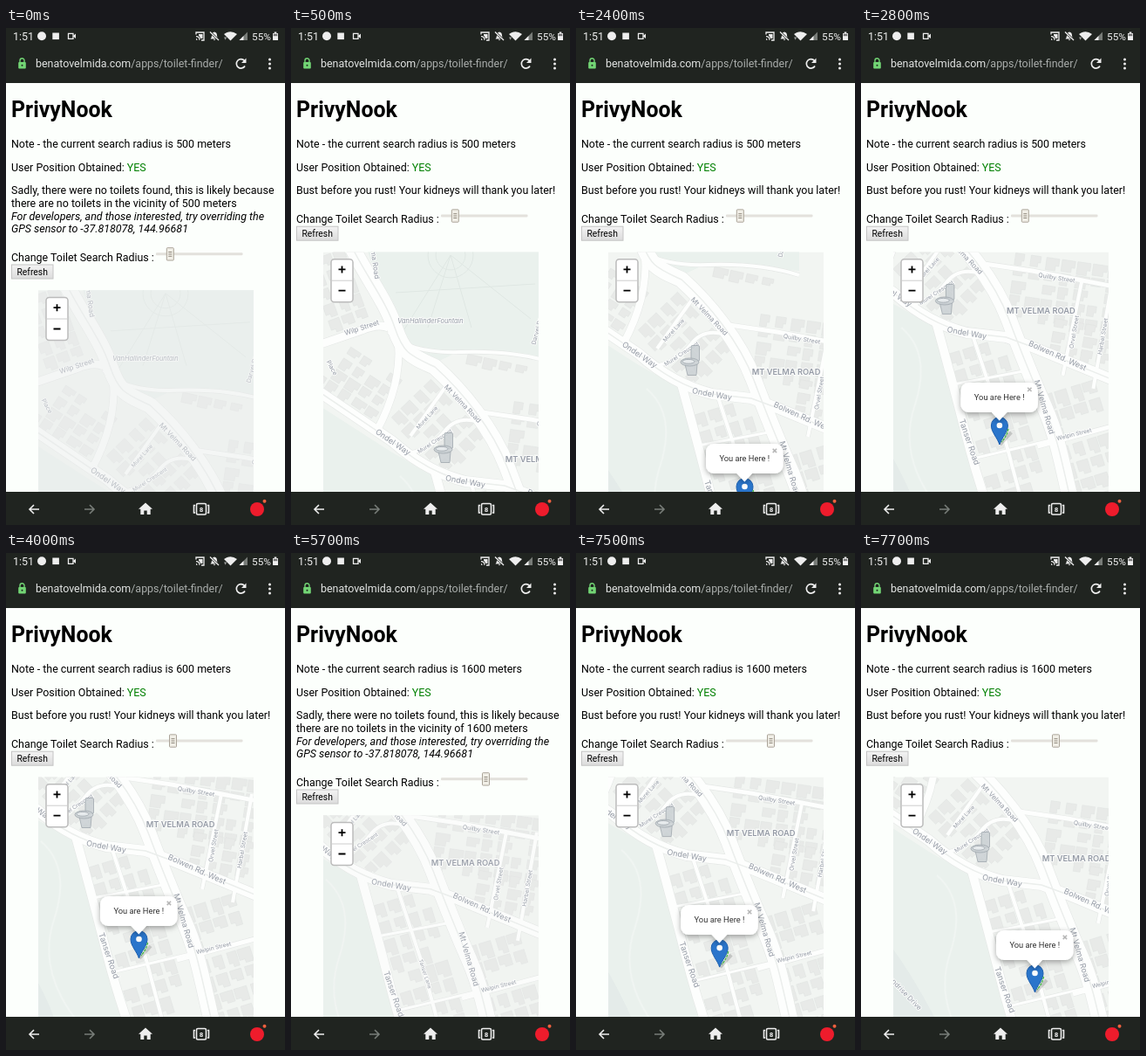
Write an HTML page that moves like this. It is 320 px wide and 569 px high and loops after 8000 ms.

```html
<!DOCTYPE html>
<html lang="en">
<head>
<meta charset="utf-8">
<title>Toilet finder</title>
<style>
  html, body { margin: 0; height: 100%; overflow: hidden; background: #fcfffc; }
  body > svg { display: block; width: 100vw; height: 100vh; }
  text { font-family: Roboto, sans-serif; font-size: 12.44px; }
  .label { font-family: Inter, sans-serif; fill: #959ba6; text-anchor: middle;
           paint-order: stroke; stroke: #fbfcfb; stroke-width: 2px; stroke-linejoin: round; }
  .line { fill: none; stroke: #eee; stroke-width: 1.3; }
  .light { fill: #eee; }
</style>
</head>
<body>
<svg viewBox="0 0 320 569" preserveAspectRatio="none">
  <defs>
    <filter id="shadow" x="-20%" y="-30%" width="140%" height="180%">
      <feDropShadow dx="0" dy="2" stdDeviation="3" flood-opacity=".35"/>
    </filter>
    <linearGradient id="face" x2="0" y2="1">
      <stop stop-color="#f3f3f3"/><stop offset="1" stop-color="#dcdcdc"/>
    </linearGradient>
  </defs>
  <rect width="320" height="569" fill="#fcfffc"/>

  <!-- Page -->
  <text x="6" y="102" style="font-size:24.9px;font-weight:700">PrivyNook</text>
  <text id="note" x="6" y="136.5"></text>
  <text x="6" y="163.5">User Position Obtained: <tspan fill="#008000">YES</tspan></text>
  <text id="found" x="6" y="190.3">Bust before you rust! Your kidneys will thank you later!</text>
  <g id="missing">
    <text x="6" y="190.3">Sadly, there were no toilets found, this is likely because</text>
    <text id="vicinity" x="6" y="204.9"></text>
    <g font-style="italic">
      <text x="6" y="219.5">For developers, and those interested, try overriding the</text>
      <text x="6" y="234.1">GPS sensor to -37.818078, 144.96681</text>
    </g>
  </g>
  <g id="controls">
    <text x="6" y="267.3">Change Toilet Search Radius :</text>
    <rect x="172" y="257.3" width="99.5" height="3" rx="1" fill="#e3e1dc"/>
    <g id="thumb">
      <rect x="-4" y="251.7" width="8" height="14.3" rx=".8" fill="#f1efe7" stroke="#aaa398"/>
      <path d="M-2 256.5h4m-4 2.4h4m-4 2.4h4" stroke="#8f887d"/>
    </g>
    <rect x="6.5" y="271" width="47.5" height="16" fill="url(#face)" stroke="#c4c4c4"/>
    <text x="30.2" y="282.7" text-anchor="middle" style="font-size:10.37px">Refresh</text>
  </g>

  <!-- Map -->
  <svg id="map" x="37" width="247" height="300">
    <rect width="247" height="300" fill="#f2f5f2"/>
    <g id="world">
      <path fill="#eaf1ed" d="M2 70H215V195L110 186 75 203 45 188 30 150Z"/>
      <path fill="#eaf1ed" d="M-70 238L31 303 85 333 100 400 138 545H-70Z"/>
      <path fill="#e4ebe9" d="M-70 350Q-20 390 25 470T50 545H-70Z"/>
      <g fill="none" stroke="#dfe7e3">
        <circle cx="98" cy="77" r="26"/><circle cx="98" cy="77" r="17"/>
        <path d="M98 77L72 160M98 77L122 160M98 77L190 150M98 77L40 170M35 120L195 110"/>
        <path d="M40 330Q75 360 55 420T85 540" stroke="#f0f5f2" stroke-width="2"/>
      </g>
      <g id="buildings" fill="#e8eae8" stroke="#dfe2e0" stroke-width=".5"></g>
      <g id="roads" fill="none" stroke-linejoin="round"></g>
      <g id="labels"></g>
      <g id="markers">
        <g fill="#cbd0d4" fill-opacity=".85" stroke="#a0a8ae" stroke-width=".8">
          <path d="M84 302L87 314.500H97L98 302Z"/>
          <rect x="91" y="280.500" width="9.500" height="18" rx="1.500"/>
          <ellipse cx="89.500" cy="299.500" rx="10.500" ry="4.500"/>
          <ellipse cx="88" cy="298.800" rx="7" ry="2.400" fill="#eceff1"/>
        </g>
        <path d="M153 464L166 450" stroke="#555" stroke-opacity=".25" stroke-width="4"/>
        <path d="M152.500 464C150 456 143 450 143 442A9.500 9.500 0 0 1 162 442C162 450 155 456 152.500 464Z" fill="#2a75cb" stroke="#1d5fae"/>
        <path d="M162.500 446Q161 454 155 461" fill="none" stroke="#49b84a" stroke-width="1.400" stroke-dasharray="3 1"/>
        <circle cx="152.500" cy="442" r="3.300" fill="#fff"/>
        <path d="M117 393H187.500A9 9 0 0 1 196.500 402V418A9 9 0 0 1 187.500 427H161L152.300 436.500 143.500 427H117A9 9 0 0 1 108 418V402A9 9 0 0 1 117 393Z" fill="#fff" filter="url(#shadow)"/>
        <text x="152.300" y="413.300" text-anchor="middle" fill="#333" style="font-size:9.33px">You are Here !</text>
        <path d="M184.700 398.700l4.400 4.400m0-4.400l-4.400 4.400" stroke="#b5b5b5" stroke-width="1.500"/>
      </g>
    </g>
    <rect id="veil" width="247" height="300" fill="#e9ebeb"/>
    <rect x="9" y="8.300" width="25" height="49" rx="3.500" fill="#fff" stroke="#bbb" stroke-width="1.500"/>
    <path d="M9.500 32.800h24" stroke="#ccc"/>
    <path d="M17.500 20h8m-4-4v8M17.500 44.300h8" stroke="#000" stroke-width="1.800"/>
  </svg>

  <!-- Status bar and address bar -->
  <rect width="320" height="63" fill="#202420"/>
  <text x="8" y="13.700" class="light">1:51</text>
  <g class="light">
    <circle cx="41" cy="9.300" r="5"/>
    <rect x="53.300" y="5.500" width="7.600" height="7.600"/>
    <path d="M77 9l3-2.500v5.500l-3-2.500zM234.500 12.500q1.500-1.500 1.500-4 0-3.500 3-4 3 .5 3 4 0 2.500 1.500 4zM237.800 13.300h2.400q-1.200 2-2.400 0z"/>
    <path d="M250 7Q257.500 1.500 265 7L257.500 14.500Z"/>
    <path d="M267.500 14L277 4.500V14Z" fill="#777b77"/>
    <path d="M267.500 14L272.500 9V14Z"/>
    <path d="M306 6h1.700V4.600h2.600V6h1.700v8h-6z"/>
    <path d="M218 13.700v-1.600q1.600 0 1.600 1.600zM221 7h4.500v5h-2.500q-.5-2.500-2-3.500z"/>
  </g>
  <path d="M306.700 6.700h4.600v2.500h-4.600z" fill="#777"/>
  <path d="M234 4.500l10 9.500" stroke="#202420" stroke-width="2.500"/>
  <path class="line" d="M71.500 6.300h5.500v6h-5.500zM234 4.500l10 9.500M218 7.500V5h9v9h-3M218 9.700q4 0 4 4"/>
  <path id="traffic" d="M250 10.500h3.200l-1.600 3.200z" class="light"/>
  <text x="282" y="13.700" class="light" style="font-size:11.800px">55%</text>

  <rect x="14.200" y="39" width="8.600" height="7.500" rx="1" fill="#72d574"/>
  <path d="M16 39.500v-2.200a2.500 2.500 0 0 1 5 0v2.200" fill="none" stroke="#72d574" stroke-width="1.400"/>
  <circle cx="18.500" cy="42.700" r="1" fill="#202420"/>
  <text x="34" y="45.400" fill="#e2e4e3">benatovelmida.com<tspan fill="#a9adab">/apps/toilet-finder/</tspan></text>
  <path class="line" style="stroke-width:1.700" d="M274 43.500A5.200 5.200 0 1 1 273.500 37.500"/>
  <path class="light" d="M275.500 34.500v5.500h-5.500z"/>
  <g class="light"><circle cx="302.500" cy="36" r="1.500"/><circle cx="302.500" cy="41" r="1.500"/><circle cx="302.500" cy="46" r="1.500"/></g>

  <!-- Navigation bar -->
  <rect y="531" width="320" height="38" fill="#202420"/>
  <path class="line" style="stroke-width:1.600" d="M38 551H27m5-5l-5 5 5 5"/>
  <path class="line" style="stroke:#777c78;stroke-width:1.600" d="M90 551h11m-5-5l5 5-5 5"/>
  <path class="light" d="M160 543.500l8 7.200h-2.300v6.300h-4v-4.500h-3.400v4.500h-4v-6.300H152z"/>
  <rect class="line" style="stroke-width:1.600" x="218.500" y="544.500" width="11" height="12.500" rx="1.500"/>
  <path class="line" style="stroke-width:1.600" d="M217 546.500h-1.500v8.500h1.500M231 546.500h1.500v8.500h-1.500"/>
  <text x="224" y="553.800" class="light" text-anchor="middle" style="font-size:8px;font-weight:700">8</text>
  <circle cx="288" cy="551" r="8" fill="#ee1c2c"/>
  <circle cx="296.500" cy="541.800" r="2" fill="#f0603f"/>
</svg>

<script>
const $ = id => document.getElementById(id);
const add = (parent, markup) => $(parent).insertAdjacentHTML('beforeend', markup);

let seed = 11;
const random = () => (seed = seed * 16807 % 2147483647) / 2147483647;

// A rotated grid of irregular buildings around a centre
function block(cx, cy, angle, cols, rows, w, h) {
  let shapes = '';
  for (let i = 0; i < cols; i++) for (let j = 0; j < rows; j++) {
    if (random() < 0.1) continue;
    const bw = w * (0.58 + 0.34 * random()), bh = h * (0.58 + 0.34 * random());
    const x = (i - cols / 2) * w, y = (j - rows / 2) * h;
    shapes += `<path d="M${x} ${y}h${bw}v${bh * 0.6}h${-bw * 0.25}v${bh * 0.4}h${-bw * 0.75}z"/>`;
  }
  add('buildings', `<g transform="translate(${cx} ${cy}) rotate(${angle})">${shapes}</g>`);
}
block(150, 442, 73, 9, 4, 21, 17);
block(250, 470, 73, 7, 4, 21, 17);
block(228, 293, 8, 7, 5, 18, 16);
block(248, 348, 10, 4, 3, 18, 15);
block(84, 277, 46, 5, 4, 19, 17);
block(-10, 222, 33, 5, 4, 18, 15);
block(-32, 120, 70, 5, 3, 18, 16);
block(163, 207, 12, 5, 1, 19, 14);

const roads = [
  ['M27 165Q50 190 110 188T215 200', 4],
  ['M52 284L92 228', 4],
  ['M45 305Q75 300 90 280T130 268', 4],
  ['M128 256L190 265 300 286', 5],
  ['M225 385L247 276', 4],
  ['M260 400L282 276', 4],
  ['M122 340L150 425 182 545', 4],
  ['M196 466L300 438', 5],
  ['M100 395L190 378M122 480L215 458', 3],
  ['M38 178Q42 225 13 279', 8],
  ['M-60 182L-4 163Q15 155 27 160', 9],
  ['M80 325Q98 390 112 445T142 545', 10],
  ['M-55 232L31 290Q70 325 115 336L160 341 190 352 300 397', 12],
  ['M-14 70C4 105 24 130 34 160S52 192 80 205C110 232 146 275 163 320S188 385 204 421S225 490 238 545', 18]
];
const stroke = (d, color, width) => add('roads', `<path d="${d}" stroke="${color}" stroke-width="${width}"/>`);
roads.forEach(([d, width]) => stroke(d, '#e5e8e6', width + 1.3));
roads.forEach(([d, width]) => stroke(d, '#fdfefd', width));
roads.slice(-2).forEach(([d]) => stroke(d, '#ebeeec', 1.5));

const label = (text, x, y, angle, size, style = '') => add('labels',
  `<text class="label" transform="translate(${x} ${y}) rotate(${angle})" dy=".35em" style="font-size:${size}px;${style}">${text}</text>`);
const bold = 'font-weight:600';
label('Wilp Street', -4, 160, -18, 8);
label('Mt Velma Road', 10, 76, 82, 8);
label('Mt Velma Road', 112, 247, 46, 8);
label('Mt Velma Road', 204, 421, 74, 9);
label('MT VELMA ROAD', 200, 311, 0, 9.3, bold);
label('Ondel Way', 32, 291, 34, 9);
label('Ondel Way', 115, 336, 10, 9);
label('Bolwen Rd. West', 219, 362, 24, 9);
label('Tanser Road', 118, 461, 71, 9.3);
label('Tanser Lane', 154, 438, 72, 6);
label('Quilby Street', 218, 273, 9, 7);
label('Orvel Street', 238, 335, -80, 6.8);
label('Harbel Street', 271, 340, -80, 6.8);
label('Welpin Street', 238, 452, -14, 6.5);
label('Murel Lane', 71, 263, -48, 6.3);
label('Murel Crescent', 80, 290, -33, 6.3);
label('Pondrise Drive', 2, 463, 46, 8);
label('Place', -38, 206, 62, 7);
label('Darvel Road', 198, 160, -75, 7);
label('VanHallinderFountain', 75, 152, 0, 7.4, 'font-style:italic');

// Map drags: start, steps, x and y travelled, easing exponent
const drags = [
  [1900, 6, -44, -100, 1.25],
  [2600, 4, -41, -83, 1],
  [7500, 3, 47, 39, 1]
];
const smooth = k => k * k * (3 - 2 * k);
const stepAt = (t, start) => Math.floor((t - start) / 100);

function draw(now) {
  const t = now % 8000;
  const missing = t < 500 || (t >= 5200 && t < 6000);
  const radius = t < 4000 ? 500 : t < 4100 ? 600 : t < 4200 ? 1100 : 1600;
  const lift = missing ? 0 : -43.8;

  $('note').textContent = `Note - the current search radius is ${radius} meters`;
  $('vicinity').textContent = `there are no toilets in the vicinity of ${radius} meters`;
  $('missing').style.display = missing ? '' : 'none';
  $('found').style.display = missing ? 'none' : '';
  $('controls').setAttribute('transform', `translate(0 ${lift})`);
  $('thumb').setAttribute('transform', `translate(${188.3 + (radius - 500) * 0.032} 0)`);
  $('map').setAttribute('y', 300.2 + lift);

  let x = 85, y = 183;
  for (const [start, steps, dx, dy, power] of drags) {
    const k = Math.max(0, Math.min(1, (stepAt(t, start) + 1) / steps));
    const eased = smooth(k) ** power;
    x += dx * eased;
    y += dy * eased;
  }
  $('world').setAttribute('transform', `translate(${x - 37} ${y - 256.4})`);

  const veil = t < 200 ? [0.45, 0.2][stepAt(t, 0)]
    : t >= 5200 && t < 6000 ? [0.7, 0.45, 0.25, 0.1][Math.min(3, stepAt(t, 5200))] : 0;
  $('veil').setAttribute('opacity', veil);
  const shown = t >= 6000 && t < 6300 ? [0.3, 0.6, 0.85][stepAt(t, 6000)] : 1;
  $('markers').setAttribute('opacity', missing ? 0 : shown);
  $('traffic').setAttribute('opacity', t < 5700 ? 0.6 : 0);
}

const begin = performance.now();
function tick() {
  draw(performance.now() - begin);
  requestAnimationFrame(tick);
}
tick();
</script>
</body>
</html>
```
